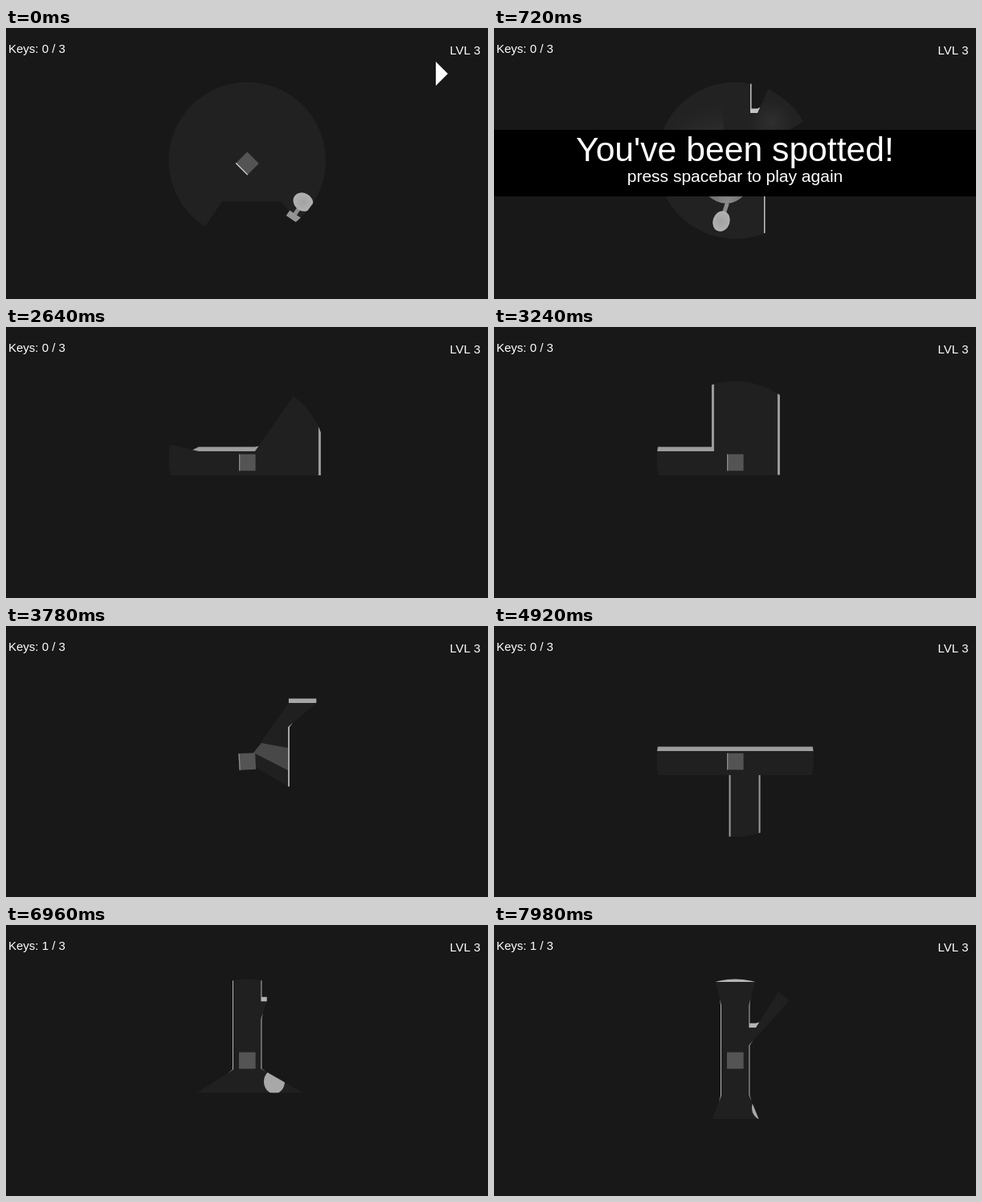
An HTML page with a canvas that plays this animation: 600x338 px, repeating every 8 s.

```html
<!DOCTYPE html>
<html lang="en">
<head>
<meta charset="utf-8">
<style>
  html, body { margin: 0; width: 100%; height: 100%; overflow: hidden; background: #181818; }
  canvas { display: block; }
</style>
</head>
<body>
<canvas id="stage" width="600" height="338"></canvas>
<script>
const ctx = document.getElementById('stage').getContext('2d');
const LOOP = 8000, SPOTTED = 300, RESTART = 840, PICKUP = 6360;
const EYE = { x: 300, y: 169.3 }, SIGHT = 97.7, PLAYER = 20.6;
const FONT = '"Liberation Sans", Arial, sans-serif';

const progress = (t, from, to) => Math.min(1, Math.max(0, (t - from) / (to - from)));

// Walls are solid polygons; most are boxes that reach past the stage.
const box = (l, t, r, b) => [[l, t], [r, t], [r, b], [l, b]];
const ceiling = y => box(-100, -100, 700, y);
const ground = y => box(-100, y, 700, 500);
const leftOf = x => box(-100, -100, x, 500);
const rightOf = x => box(x, -100, 700, 500);

function polygon(points) {
  const path = new Path2D();
  points.forEach(([x, y]) => path.lineTo(x, y));
  path.closePath();
  return path;
}

function shape(points, color) {
  ctx.fillStyle = color;
  ctx.fill(polygon(points));
}

function ellipse(x, y, rx, ry, color) {
  ctx.fillStyle = color;
  ctx.beginPath();
  ctx.ellipse(x, y, rx, ry, 0, 0, 7);
  ctx.fill();
}

function glow(x, y, r, inner, outer) {
  const g = ctx.createRadialGradient(x, y, 0, x, y, r);
  g.addColorStop(0, inner);
  g.addColorStop(1, outer);
  return g;
}

function lamp(x, y, r, alpha) {
  ellipse(x, y, r, r, glow(x, y, r, `rgba(255,255,255,${alpha})`, 'rgba(255,255,255,0)'));
}

function guard(x, y, degrees, hasBase) {
  ctx.save();
  ctx.translate(x, y);
  ctx.rotate(degrees * Math.PI / 180);
  ctx.fillStyle = '#8c8c8c';
  ctx.fillRect(-2.5, 6, 5, 18);
  if (hasBase) shape(box(-8, 18, 9, 26), '#949494');
  ellipse(0, 0, hasBase ? 13 : 10.5, hasBase ? 11 : 13, glow(0, 0, 14, '#a2a2a2', '#b4b4b4'));
  ctx.restore();
}

function key(x, y) {
  ctx.strokeStyle = ctx.fillStyle = '#bcbcbc';
  ctx.lineWidth = 1.6;
  ctx.beginPath();
  ctx.ellipse(x, y, 5.3, 4.5, 0, 0, 7);
  ctx.moveTo(x + 1, y - 5);
  ctx.lineTo(x + 1, y - 20);
  ctx.stroke();
  ctx.fillRect(x + 1, y - 20, 3, 5);
}

function spotlight() {
  ctx.fillStyle = glow(290, 220, 130, '#909090', 'rgba(40,40,40,0)');
  ctx.fill(new Path2D('M265 208Q213 165 215 120Q250 80 284 100L286 130L312 208Q290 230 265 208Z'));
  lamp(345, 118, 28, .06);
}

// The player walks down to the key, then back up until he stops.
const keyHall = {
  left: 283, right: 317.4,
  shift: t => [2 * progress(t, 6000, 6550) - 2, .057 * Math.abs(Math.min(t, 7535) - 6570) - 55]
};
const hallLeft = [box(-100, 100, keyHall.left, 213), ground(242)];
const still = () => [0, 0];

// inside: drawn on the visible floor only; above: drawn over shadows too.
const scenes = [
  {
    until: SPOTTED, floor: '#212121', wall: '#999', side: 2, turn: () => -45,
    shift: t => [-.05 * t, .015 * t],
    walls: [box(269, 216, 342, 400)],
    above: () => guard(370, 217, 34, true)
  },
  {
    until: RESTART, floor: '#222', wall: '#c4c4c4', side: 1.5, turn: () => -45,
    shift: still,
    walls: [box(319, 0, 328, 106), box(336, 147, 360, 400)],
    inside: spotlight,
    above: () => guard(283, 241, 198, false)
  },
  {
    until: 2300, floor: '#282828', wall: '#d8d8d8', side: 2,
    turn: t => -38 * (progress(t, 900, 1500) - progress(t, 1800, 2200)),
    shift: t => [0, .02 * (t - 1680)],
    walls: [
      ceiling(76), ground(222), box(-100, 0, 258.5, 168),
      box(335, 0, 354, 113), box(335, 158, 700, 400),
      [[226, 187], [232, 203], [214, 211]]
    ],
    inside() {
      lamp(300, 165, 90, .06);
      lamp(300, 129, 13, .22);
      lamp(303, 194, 13, .22);
    }
  },
  {
    until: 3300, floor: '#202020', wall: '#9c9c9c', side: 3, turn: () => 0,
    shift: t => [-.06 * (t - 2640), 0],
    walls: [box(240, -100, 310, 155), rightOf(389), ground(185)]
  },
  {
    until: 4260, floor: '#202020', wall: '#a6a6a6', side: 2, turn: () => -3, sight: 150,
    shift: still,
    walls: [
      leftOf(289), box(0, 0, 308, 158), box(0, 176, 311, 400),
      box(351, 126, 380, 400), ceiling(96)
    ],
    inside: () => shape([[308, 158], [318, 146], [351, 152], [351, 180]], '#484848')
  },
  {
    until: 5040, floor: '#202020', wall: '#9c9c9c', side: 2, turn: () => 0,
    shift: t => [.05 * (t - 4650), 0],
    walls: [ceiling(156), box(-200, 186, 281, 400), box(316, 186, 700, 400)]
  },
  {
    until: 6600, floor: '#222', wall: '#a8a8a8', side: 1, turn: () => 0,
    shift: keyHall.shift,
    walls: [...hallLeft, rightOf(keyHall.right)],
    inside(t) {
      ellipse(261, 226, 15, 15, '#c0c0c0');
      if (t < PICKUP) {
        lamp(303, 226, 24, .13);
        key(303, 236);
      }
    }
  },
  {
    until: LOOP, floor: '#202020', wall: '#b4b4b4', side: 1, turn: () => 0,
    shift: keyHall.shift,
    walls: [
      ...hallLeft, box(0, -100, 340, 71),
      box(keyHall.right, 100, 326, 128), box(keyHall.right, 150, 420, 212)
    ],
    inside: () => ellipse(334, 228, 13, 15, '#a8a8a8')
  }
];

function castRay(angle, edges) {
  const dx = Math.cos(angle), dy = Math.sin(angle);
  let reach = 220, hit = null;
  for (const edge of edges) {
    const [[x1, y1], [x2, y2]] = edge;
    const sx = x2 - x1, sy = y2 - y1, cross = dx * sy - dy * sx;
    if (Math.abs(cross) < 1e-9) continue;
    const ox = x1 - EYE.x, oy = y1 - EYE.y;
    const d = (ox * sy - oy * sx) / cross, along = (ox * dy - oy * dx) / cross;
    if (d > 0 && d < reach && along >= 0 && along <= 1) {
      reach = d;
      hit = edge;
    }
  }
  return { x: EYE.x + dx * reach, y: EYE.y + dy * reach, dx, dy, reach, hit };
}

function look(edges) {
  const angles = Array.from({ length: 180 }, (_, i) => (i - 90) * Math.PI / 90);
  for (const [[x, y]] of edges) {
    const a = Math.atan2(y - EYE.y, x - EYE.x);
    angles.push(a - 1e-4, a + 1e-4);
  }
  return angles.sort((a, b) => a - b).map(a => castRay(a, edges));
}

// Offset of a lit face: tall above the player, thin at the sides, none below or right beside him.
function faceOffset([[x1, y1], [x2, y2]], side) {
  const length = Math.hypot(x2 - x1, y2 - y1);
  let nx = (y2 - y1) / length, ny = (x1 - x2) / length;
  let gap = (x1 - EYE.x) * nx + (y1 - EYE.y) * ny;
  if (gap < 0) { nx = -nx; ny = -ny; gap = -gap; }
  const depth = gap < 13 && Math.abs(ny) !== 1 - Math.abs(nx) ? side
    : ny > .95 || gap < 1 ? 0 : ny < -.95 ? 5.5 : side;
  return [nx * depth, ny * depth, gap];
}

function drawFaces(rays, scene) {
  const faces = new Path2D();
  const offsetOf = ray => {
    const [ox, oy, gap] = faceOffset(ray.hit, scene.side);
    return gap < 13 && scene.sight ? [0, 0] : [ox, oy];
  };
  rays.forEach((a, i) => {
    const b = rays[(i + 1) % rays.length];
    if (a.hit && a.hit === b.hit) {
      const [ox, oy] = offsetOf(a);
      faces.addPath(polygon([[a.x, a.y], [b.x, b.y], [b.x + ox, b.y + oy], [a.x + ox, a.y + oy]]));
    } else if (Math.abs(a.reach - b.reach) > 10) {
      // Light grazes a short way past the end of a wall.
      const near = a.reach < b.reach ? a : b, [ox, oy] = offsetOf(near);
      if (ox || oy) {
        faces.addPath(polygon([
          [near.x, near.y], [near.x + near.dx * 8, near.y + near.dy * 8], [near.x + ox, near.y + oy]
        ]));
      }
    }
  });
  ctx.fillStyle = scene.wall;
  ctx.fill(faces);
}

function drawScene(scene, t) {
  const [dx, dy] = scene.shift(t);
  const edges = scene.walls.flatMap(wall => {
    const corners = wall.map(([x, y]) => [x + dx, y + dy]);
    return corners.map((corner, i) => [corner, corners[(i + 1) % corners.length]]);
  });
  const rays = look(edges);
  const shifted = draw => {
    if (!draw) return;
    ctx.save();
    ctx.translate(dx, dy);
    draw(t);
    ctx.restore();
  };

  ctx.save();
  ctx.beginPath();
  ctx.arc(300.3, 165.2, scene.sight || SIGHT, 0, 7);
  ctx.clip();
  ctx.save();
  ctx.clip(polygon(rays.map(r => [r.x, r.y])));
  ctx.fillStyle = scene.floor;
  ctx.fillRect(0, 0, 600, 338);
  shifted(scene.inside);
  ctx.restore();
  drawFaces(rays, scene);
  shifted(scene.above);
  ctx.restore();
}

function drawPlayer(degrees, t) {
  ctx.save();
  ctx.translate(300.3, 169);
  ctx.rotate(degrees * Math.PI / 180);
  ctx.fillStyle = '#545454';
  ctx.fillRect(-PLAYER / 2, -PLAYER / 2, PLAYER, PLAYER);
  if (t < 5000) {
    ctx.fillStyle = degrees < -20 ? '#d0d0d0' : '#8a8a8a';
    ctx.fillRect(-PLAYER / 2, -PLAYER / 2, 1.3, PLAYER);
  }
  ctx.restore();
}

function text(value, x, y, size, align) {
  ctx.font = `${size}px ${FONT}`;
  ctx.textAlign = align;
  ctx.fillStyle = '#fff';
  ctx.fillText(value, x, y);
}

function draw(t) {
  ctx.fillStyle = '#181818';
  ctx.fillRect(0, 0, 600, 338);
  const scene = scenes.find(s => t < s.until);
  drawScene(scene, t);
  drawPlayer(scene.turn(t), t);

  if (t < SPOTTED) {
    shape([[535, 42], [550, 57], [535, 72]], '#fff');
  } else if (t < RESTART) {
    ctx.fillStyle = '#000';
    ctx.fillRect(0, 127, 600, 83);
    text("You've been spotted!", 300, 166, 42.7, 'center');
    text('press spacebar to play again', 300, 192, 21, 'center');
  }
  text(`Keys: ${t < PICKUP ? 0 : 1} / 3`, 3, 31, 15, 'left');
  text('LVL 3', 590.5, 33, 15, 'right');
}

const start = performance.now();
function tick() {
  draw((performance.now() - start) % LOOP);
  requestAnimationFrame(tick);
}
tick();
</script>
</body>
</html>
```
